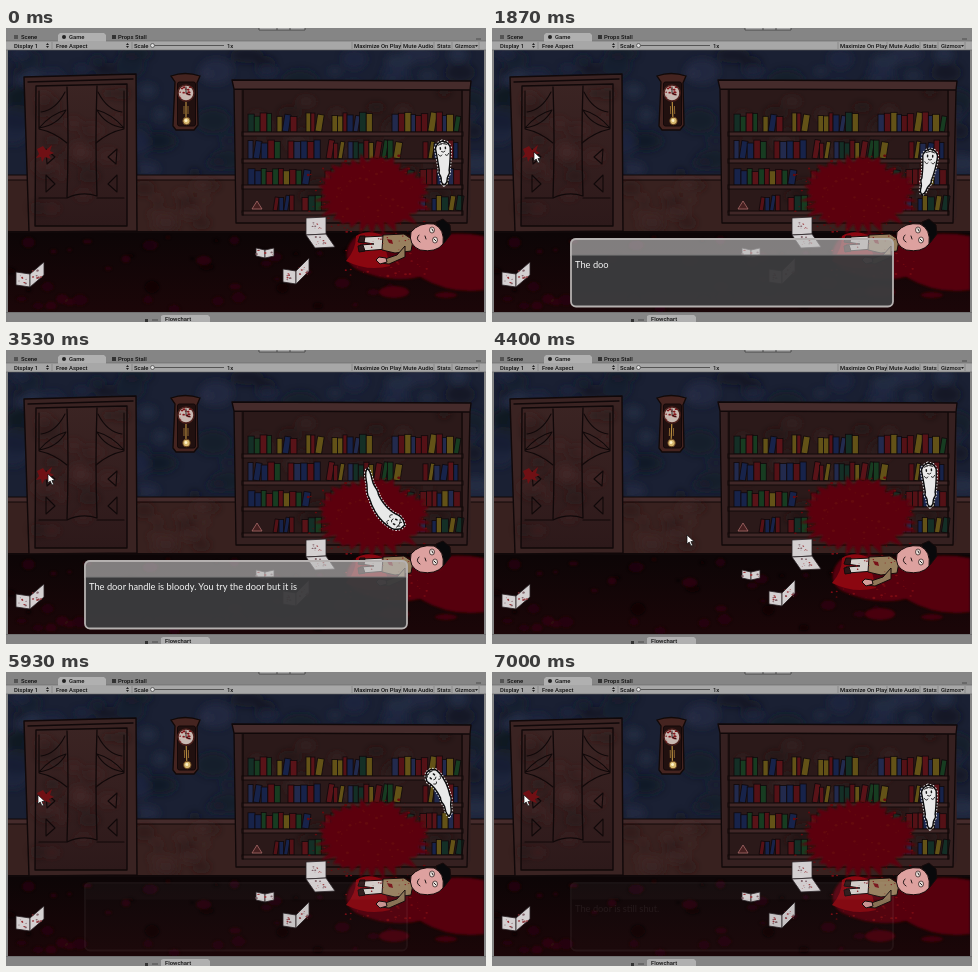
An HTML page for the animation above (7070 ms loop, 480x294 px).

```html
<!DOCTYPE html>
<html lang="en">
<head>
<meta charset="utf-8">
<title>Haunted study</title>
<style>
html, body { margin: 0; width: 100%; height: 100%; overflow: hidden; background: #858585; }
svg { position: absolute; left: 0; top: 0; width: 480px; height: 294px; }
#live { will-change: transform; }
.ui { font: 500 5.9px Roboto, "Liberation Sans", sans-serif; fill: #111; }
.say { font: 9.3px Lato, "Open Sans", sans-serif; fill: #f4f4f4; }
.ink { fill: none; stroke: #100809; stroke-linecap: round; stroke-linejoin: round; }
</style>
</head>
<body>
<svg id="room" viewBox="0 0 480 294">
  <defs>
    <filter id="soft" x="-20%" y="-20%" width="140%" height="140%"><feGaussianBlur stdDeviation="3.5"/></filter>
    <filter id="fuzz"><feGaussianBlur stdDeviation="1.1"/></filter>
    <linearGradient id="wood" x2="0" y2="1"><stop stop-color="#3b2423"/><stop offset="1" stop-color="#2d191a"/></linearGradient>
    <linearGradient id="floor" x2="0" y2="1"><stop stop-color="#0c0506"/><stop offset="1" stop-color="#1b0608"/></linearGradient>
    <clipPath id="stage"><rect x="2" y="22" width="476" height="262"/></clipPath>
    <clipPath id="wallArea"><rect x="2" y="22" width="476" height="126"/></clipPath>
  </defs>
  <g clip-path="url(#stage)">
    <rect width="480" height="294" fill="#1a2033"/>
    <g clip-path="url(#wallArea)"><g id="wall" filter="url(#soft)"></g></g>

    <!-- wainscot and floor -->
    <rect y="147" width="480" height="57" fill="#38211f"/>
    <rect y="147" width="480" height="5" fill="#452b2b"/>
    <path class="ink" d="M2 147H478M2 152H478"/>
    <g id="panel" filter="url(#soft)"></g>
    <rect y="204" width="480" height="80" fill="url(#floor)"/>
    <path class="ink" d="M2 204H478" stroke-width="2"/>
    <g id="stains" filter="url(#fuzz)"></g>

    <!-- door -->
    <path d="M18 49L130 46L131 203L23 204Z" fill="#3a2322"/>
    <path d="M30 58L121 56V198H29Z" fill="url(#wood)"/>
    <g id="doorGrain" filter="url(#soft)"></g>
    <path class="ink" d="M18 49L130 46L131 203L23 204ZM22 54L127 51M30 58L121 56V198H29Z" stroke-width="1.4"/>
    <path class="ink" d="M61 59Q63 110 61 170M91 58Q89 110 91 168M61 170Q76 163 91 168" stroke-width="1.3"/>
    <g id="carve" class="ink" stroke-width="1.1">
      <path d="M33 63V101Q48 104 61 115M33 100Q52 97 60 82Q45 86 33 100M35 84Q50 82 59 64M40 121L49 129L41 136ZM40 147L49 156L40 164ZM33 170H60"/>
    </g>
    <use href="#carve" transform="matrix(-1 0 0 1 151 0)"/>
    <path d="M31 121L37 118L40 122L46 117L44 123L48 125L43 127L45 131L39 129L36 134L35 129L30 130L33 126Z" fill="#701014"/>

    <!-- clock -->
    <path d="M165 48Q179 43 194 48L191 55L192 97L188 102H170L167 98L169 54Z" fill="#452420" stroke="#120908" stroke-width="1.3"/>
    <rect x="171.500" y="54" width="18" height="44" rx="2" fill="#21100f" stroke="#130809"/>
    <circle cx="180" cy="65" r="8" fill="#c9b9b2" stroke="#4d211d" stroke-width="1.5"/>
    <g id="clockSpots"></g>
    <path class="ink" d="M180 59V65L184 67" stroke-width=".8"/>

    <!-- bookcase -->
    <path d="M228 53L464 54L465 188L461 195H230Z" fill="#352020"/>
    <rect x="235" y="62" width="222" height="123" fill="#2b1919"/>
    <g id="caseGrain" filter="url(#soft)"></g>
    <g id="shelves"></g>
    <path d="M226 52L465 53L464 62L228 61Z" fill="#452b2b"/>
    <path class="ink" d="M226 52L465 53L464 62L228 61ZM228 61L230 195H461L464 62M237 62V187M456 63V187" stroke-width="1.3"/>
    <path d="M246 181L251 173L256 181Z" fill="#462020" stroke="#a76a69" stroke-width=".8"/>

    <!-- blood -->
    <g filter="url(#fuzz)">
      <path id="splash" fill="#5b0609"/>
      <path d="M413 211Q445 202 478 208V262Q445 267 414 249Q382 256 350 241Q332 229 348 210Q375 199 413 211Z" fill="#560609"/>
      <ellipse cx="388" cy="264" rx="15" ry="6" fill="#490609"/>
      <ellipse cx="440" cy="267" rx="11" ry="3" fill="#400508"/>
    </g>
    <g id="drops"></g>
    <path d="M340 233Q350 222 350 208Q361 201 376 207L384 238Q362 244 340 233Z" fill="#8b0710"/>

    <g id="papers"></g>

    <!-- victim -->
    <g stroke="#160b0b" stroke-linejoin="round">
      <path d="M358 209L379 208L381 221L356 223L354 217L368 216L355 214Z" fill="#d5cfca"/>
      <path d="M359 208H354L352 214L358 215ZM357 217L352 218L353 224L359 223Z" fill="#2b1717"/>
      <path d="M377 207L398 206L407 212L405 223L389 225L376 222Z" fill="#98805e"/>
      <path d="M399 218L391 227L379 231H374V235L383 236L399 229Z" fill="#8f7758"/>
      <path d="M380 230L373 229L370 232L374 236L381 234Z" fill="#d49c99"/>
      <path d="M430 194L437 191L444 197L445 206L438 215L434 218Z" fill="#09090b"/>
      <path d="M405 204Q413 194 428 196Q439 201 437 216Q430 225 414 222Q402 217 405 204Z" fill="#dda19f"/>
    </g>
    <g fill="#eee5df" stroke="#291313" stroke-width=".7"><ellipse cx="426" cy="202" rx="2.500" ry="3"/><ellipse cx="429" cy="212" rx="2.500" ry="3"/></g>
    <path class="ink" d="M426 201l1 2M428 211l2 2M413 207Q409 211 414 214M419 208l1 3" stroke-width=".9"/>
    <path d="M381 211l5 1 1 4-4-1z" fill="#791118"/>
    <g id="bodySpots"></g>
  </g>

  <!-- editor chrome -->
  <rect width="480" height="13" fill="#858585"/>
  <rect y="13" width="480" height="9" fill="#a7a7a7"/>
  <path d="M0 22H2V294H0ZM478 22H480V294H478ZM0 284H480V294H0Z" fill="#858585"/>
  <path d="M52 13V7L54 5H98L100 7V13ZM155 294V288L157 287H202L204 289V294Z" fill="#b0b0b0"/>
  <path d="M0 13H52M100 13H480M0 22H480M0 284.500H480" stroke="#666" stroke-width=".6"/>
  <path d="M253 0V2H299V0M271 0V2M284 0V2" fill="#a8a8a8" stroke="#333" stroke-width=".7"/>
  <path id="dividers" stroke="#777" stroke-width=".6"/>
  <path d="M146 17.500H218" stroke="#555"/>
  <circle cx="146.500" cy="17.500" r="2" fill="#ddd" stroke="#444" stroke-width=".7"/>
  <path d="M40 17l1.500-2 1.500 2zM40 18l1.500 2 1.500-2zM120 17l1.500-2 1.500 2zM120 18l1.500 2 1.500-2zM469 17h3l-1.500 2z" fill="#222"/>
  <path d="M8 8h4M8 10h4M9 7v4M11 7v4M470 11h5M146 292h6" stroke="#333" stroke-width=".7"/>
  <circle cx="58" cy="9" r="2" fill="#222"/>
  <rect x="106" y="7" width="4" height="4" fill="#333"/>
  <rect x="139" y="291" width="3" height="3" fill="#333"/>
  <g id="labels" class="ui"></g>
</svg>

<svg id="live" viewBox="0 0 480 294">
  <g id="pendulum">
    <path d="M180 74V92" stroke="#b58a3e" stroke-width="1.200"/>
    <path d="M178 78V86M182 78V86" stroke="#8f6731"/>
    <circle cx="180.500" cy="93" r="3.700" fill="#d8b96f" stroke="#65401f"/>
    <circle cx="180" cy="92.500" r="1.500" fill="#fff1c7"/>
  </g>
  <g stroke-linejoin="round">
    <path id="halo" fill="none" stroke="#eee" stroke-width="3.200" stroke-dasharray="1.500 1.500"/>
    <path id="sheet" fill="#e9e9e9" stroke="#0b0b0d" stroke-width="1.400"/>
    <g id="face" fill="none" stroke="#151515" stroke-linecap="round">
      <path d="M-5-4Q0-7 5-4M-3-7L-1-5M2-7L3-5"/>
      <path d="M-3-.8v1.800M3-.8v1.800" stroke-width="1.700"/>
      <path d="M-2 4Q0 6 2 4M-6 7Q-4 11-2 8M6 7Q4 11 2 8"/>
    </g>
  </g>
  <g id="dialog">
    <path d="M78 228V216Q78 210 84 210H396Q402 210 402 216V228Z" fill="#bbb" fill-opacity=".67"/>
    <path d="M79 227H401V273Q401 278 396 278H84Q79 278 79 273Z" fill="#3c3c3e" fill-opacity=".96"/>
    <rect x="79" y="211" width="322" height="67.500" rx="5" fill="none" stroke="#b5b1b0" stroke-width="1.800"/>
    <path d="M80 227H400" stroke="#777"/>
    <text id="line" class="say" x="83" y="240"></text>
  </g>
  <path id="cursor" d="M0 0V9L2.200 7L4 11L5.600 10.300L3.900 6.500H7Z" fill="#fff" stroke="#111" stroke-width=".7"/>
</svg>

<script>
const $ = id => document.getElementById(id);
const LOOP = 7070, STEP = 1000 / 15;
let seed = 41;
const rnd = (a = 0, b = 1) => {
  seed = (seed * 16807) % 2147483647;
  return a + (b - a) * seed / 2147483647;
};
function add(parent, tag, attrs, text) {
  const el = document.createElementNS("http://www.w3.org/2000/svg", tag);
  for (const k in attrs) el.setAttribute(k, attrs[k]);
  if (text) el.textContent = text;
  return $(parent).appendChild(el);
}
function blots(parent, n, [x, y, w, h], [r0, r1], fills, opacity = 1) {
  for (let i = 0; i < n; i++) {
    const r = rnd(r0, r1);
    add(parent, "ellipse", {
      cx: rnd(x, x + w), cy: rnd(y, y + h), rx: r, ry: r * rnd(.45, .9),
      fill: fills[i % fills.length], opacity
    });
  }
}

blots("wall", 95, [0, 22, 480, 126], [6, 18], ["#101522", "#222a42", "#151b2b", "#283049"], .6);
blots("panel", 16, [135, 156, 88, 42], [5, 13], ["#2c1919", "#432a28"], .5);
blots("doorGrain", 26, [30, 62, 90, 130], [5, 12], ["#281617", "#442928"], .45);
blots("caseGrain", 28, [236, 62, 220, 120], [5, 13], ["#3b2424", "#201213"], .55);
blots("stains", 52, [3, 209, 474, 72], [2, 8], ["#26070a", "#0a0405", "#32080b"], .7);
blots("clockSpots", 22, [174, 59, 12, 12], [.5, 1.3], ["#82151a"]);
blots("drops", 85, [302, 127, 120, 76], [.4, 1.7], ["#650a0e"]);
blots("drops", 55, [338, 202, 100, 46], [.4, 1.5], ["#7c0b13"]);
blots("bodySpots", 16, [358, 207, 45, 15], [.4, 1], ["#83141a"]);

// Each shelf: base line, tallest book, empty stretches
const covers = ["#541116", "#173c21", "#17234a", "#591318", "#635217", "#142f26", "#222a4d"];
function shelf(base, tall, ...gaps) {
  for (let x = 242; x < 450;) {
    const gap = gaps.find(([from, to]) => x > from - 4 && x < to);
    if (gap) { x = gap[1]; continue; }
    const w = rnd(4, 7), h = rnd(tall * .78, tall), lean = rnd() > .82 ? 9 : 0;
    add("shelves", "rect", {
      x, y: base - h, width: w, height: h, fill: covers[Math.floor(rnd(0, covers.length))],
      stroke: "#10090b", "stroke-width": .8, transform: `rotate(${lean} ${x + w} ${base})`
    });
    x += w + lean / 5;
  }
  add("shelves", "rect", { x: 236, y: base, width: 221, height: 4, fill: "#402727", stroke: "#120a0b" });
}
shelf(104, 20, [266, 271], [293, 300], [321, 326], [370, 386]);
shelf(131, 20, [276, 282], [314, 320], [337, 342], [397, 417]);
shelf(157, 17, [308, 319], [346, 378], [408, 414]);
shelf(183, 16, [242, 267], [288, 296], [316, 398], [418, 426]);

let splash = "";
for (let i = 0; i < 64; i++) {
  const a = i * Math.PI / 32, r = i % 2 ? rnd(.72, .9) : rnd(.88, 1.12);
  splash += `${i ? "L" : "M"}${366 + 58 * r * Math.cos(a)} ${165 + 40 * r * Math.sin(a)}`;
}
$("splash").setAttribute("d", splash + "Z");

// Two pages share the spine from (x, y) by (sx, sy)
function openBook(x, y, sx, sy, ax, ay, bx, by, spots) {
  for (const [px, py] of [[ax, ay], [bx, by]]) {
    add("papers", "polygon", {
      points: [x, y, x + px, y + py, x + px + sx, y + py + sy, x + sx, y + sy],
      fill: "#d4d0d1", stroke: "#292125", "stroke-width": .8
    });
    const cx = x + (px + sx) / 2, cy = y + (py + sy) / 2;
    blots("papers", spots, [cx - 5, cy - 4, 10, 8], [.4, 1.3], ["#9a3439", "#81636a"]);
  }
}
openBook(24, 246, 0, 13, -14, -2, 14, -12, 10);
openBook(259, 222, 0, 8, -9, -2, 9, -2, 3);
openBook(290, 243, 0, 13, -13, -2, 13, -13, 10);
openBook(300, 207, 20, -1, 0, -17, 9, 13, 10);

const label = (y, ...items) => items.forEach(([text, x]) => add("labels", "text", { x, y }, text));
label(11, ["Scene", 15], ["Game", 63], ["Props Stall", 112]);
label(19.5, ["Display 1", 8], ["Free Aspect", 50], ["Scale", 128], ["1x", 221],
  ["Maximize On Play", 348], ["Mute Audio", 397], ["Stats", 431], ["Gizmos", 449]);
label(292.5, ["Flowchart", 159]);
$("dividers").setAttribute("d", [46, 126, 346, 395, 428, 446, 473].map(x => `M${x} 14V21`).join(""));

// One looping flight: progress, head, middle of the spine, tail tip
const flight = [
  [0, 440, 127, 435, 150, 423, 174],
  [.14, 421, 101, 436, 117, 443, 145],
  [.27, 393, 87, 418, 91, 436, 112],
  [.38, 367, 107, 378, 92, 402, 88],
  [.46, 373, 150, 363, 126, 369, 99],
  [.54, 398, 175, 373, 157, 361, 117],
  [.66, 433, 161, 415, 175, 388, 172],
  [.8, 441, 122, 439, 148, 426, 170],
  [1, 436, 113, 438, 135, 438, 157]
];
const FIRST = { from: 2530, to: 4380 }, SECOND = { from: 5762, to: 6962 };
const cursorKeys = [[0, 215, -14], [150, 215, -14], [650, 90, 70], [1000, 43, 127], [1270, 43, 127],
  [1500, 42, 124], [3850, 42, 124], [4400, 195, 185], [4850, 195, 185],
  [5450, 55, 133], [5750, 32, 123], [LOOP, 32, 123]];

function track(keys, t, smooth) {
  let i = 0;
  while (i < keys.length - 2 && keys[i + 1][0] <= t) i++;
  const a = keys[i], b = keys[i + 1], span = b[0] - a[0], u = (t - a[0]) / span;
  const p = keys[Math.max(i - 1, 0)], n = keys[Math.min(i + 2, keys.length - 1)];
  return a.slice(1).map((v, k) => {
    const j = k + 1, w = b[j];
    if (!smooth) return v + (w - v) * u;
    const m0 = (w - p[j]) / (b[0] - p[0]) * span, m1 = (n[j] - v) / (n[0] - a[0]) * span;
    return v + u * (m0 + u * (3 * (w - v) - 2 * m0 - m1 + u * (2 * (v - w) + m0 + m1)));
  });
}

function ghostPose(t) {
  for (const { from, to } of [FIRST, SECOND])
    if (t >= from && t <= to) return track(flight, (t - from) / (to - from), true);
  // Hover, slowly sinking towards the next take-off
  const [from, to] = t > FIRST.to && t < SECOND.from
    ? [FIRST.to, SECOND.from]
    : [SECOND.to - LOOP, FIRST.from];
  const u = ((t > SECOND.to ? t - LOOP : t) - from) / (to - from);
  const rest = flight[flight.length - 1];
  return rest.slice(1).map((v, k) => v + (flight[0][k + 1] - v) * u * u);
}

function drawGhost([hx, hy, mx, my, tx, ty]) {
  const cx = 2 * mx - (hx + tx) / 2, cy = 2 * my - (hy + ty) / 2;
  const left = [], right = [];
  const at = s => {
    const q = 1 - s;
    const dx = q * (cx - hx) + s * (tx - cx), dy = q * (cy - hy) + s * (ty - cy);
    return [q * q * hx + 2 * q * s * cx + s * s * tx, q * q * hy + 2 * q * s * cy + s * s * ty, Math.atan2(dy, dx)];
  };
  for (let i = 0; i <= 24; i++) {
    const s = i / 24, [x, y, a] = at(s);
    const ripple = s > .7 ? Math.sin(s * 28) * 2.7 * (1 - s) : 0;
    const w = 8 * Math.min(1, Math.sqrt(s * 7)) * Math.pow(1 - s, .45) + ripple;
    left.push(`${x - Math.sin(a) * w} ${y + Math.cos(a) * w}`);
    right.unshift(`${x + Math.sin(a) * w} ${y - Math.cos(a) * w}`);
  }
  const d = "M" + left.concat(right).join("L") + "Z";
  $("halo").setAttribute("d", d);
  $("sheet").setAttribute("d", d);
  const [x, y, a] = at(.16);
  $("face").setAttribute("transform", `translate(${x} ${y}) rotate(${a * 180 / Math.PI - 90}) scale(.85)`);
}

const ramp = (t, from, to) => Math.min(1, Math.max(0, (t - from) / (to - from)));
const fade = t => ramp(t, 1530, 1730) - ramp(t, 3950, 4200) + ramp(t, 5915, 6165) - ramp(t, 6770, 7020);
const typed = (text, t, start) => text.slice(0, Math.max(0, Math.floor((t - start) * .03 + .01)));
function speech(t) {
  if (t > 5000) return typed("The door is still shut.", t, 6000);
  return typed("The door handle is bloody.", t, 1620) + typed(" You try the door but it is locked.", t, 2620);
}

const begin = performance.now();
function draw(now) {
  const n = Math.min(105, Math.floor((Math.max(0, now - begin) % LOOP + 4) / STEP));
  const t = n * STEP;
  drawGhost(ghostPose(t));
  $("cursor").setAttribute("transform", `translate(${track(cursorKeys, t)})`);
  $("dialog").setAttribute("opacity", fade(t));
  $("line").textContent = speech(t);
  $("pendulum").setAttribute("transform", `rotate(${2.5 * Math.sin(t / LOOP * 14 * Math.PI)} 180 66)`);
  requestAnimationFrame(draw);
}
draw(begin);
</script>
</body>
</html>
```
